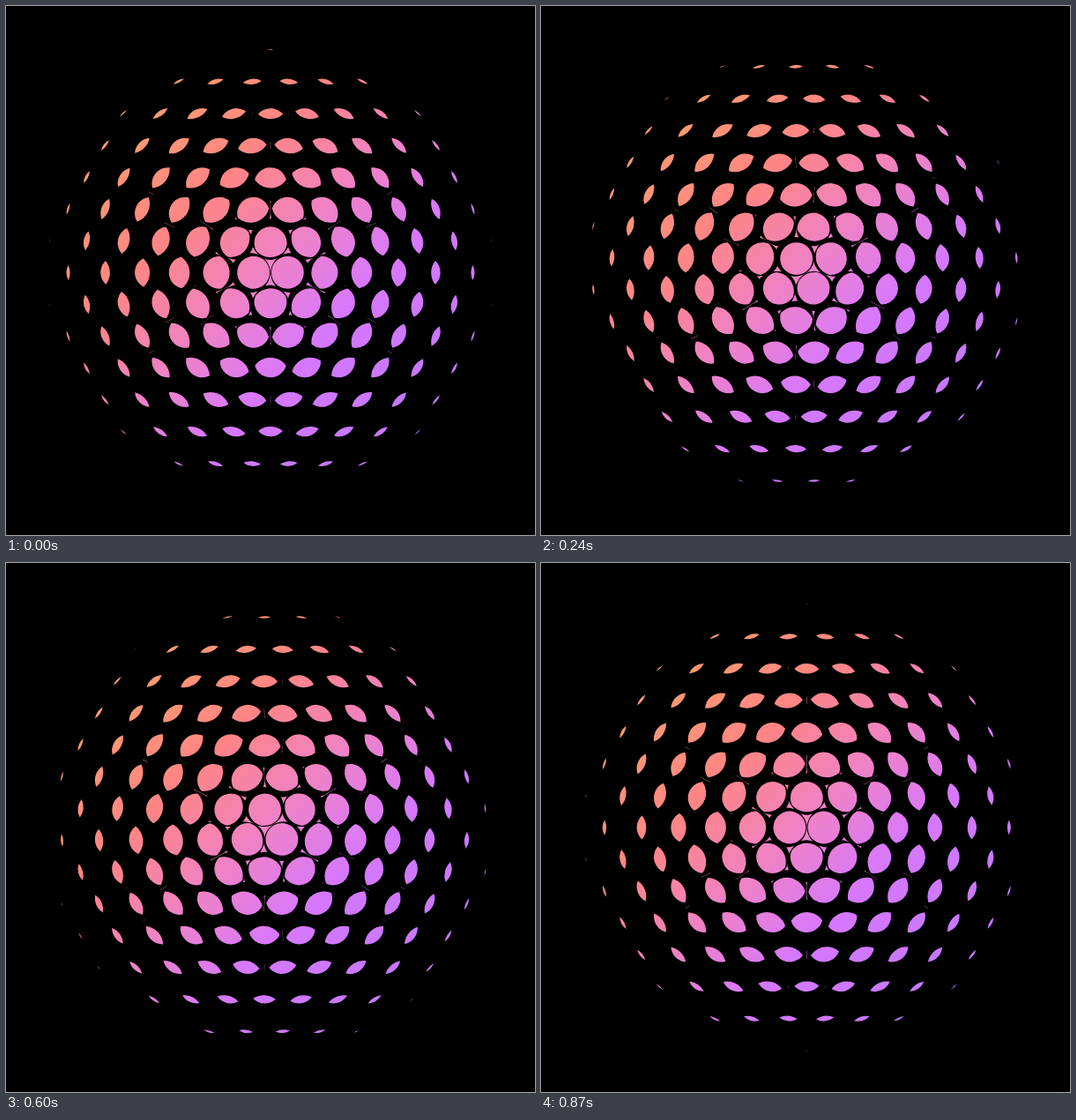
An HTML page with a canvas for the animation above (0.9 s loop, 600x600 px).

```html
<!DOCTYPE html>
<html>
<head>
<meta charset="utf-8">
<style>
html, body { margin: 0; width: 100%; height: 100%; overflow: hidden; background: #000; }
canvas { display: block; width: 600px; height: 600px; }
</style>
</head>
<body>
<canvas id="stage" width="600" height="600"></canvas>
<script>
// A hexagonal bundle of black tubes in perspective, sliding over a gradient.
const ctx = document.getElementById('stage').getContext('2d');
const C = 300;                    // vanishing point
const GAP = 42;                   // tube spacing
const ROW = GAP * Math.sqrt(3) / 2;
const INNER = 20, OUTER = 20.8;   // tube radii
const FAR = 0.922, NEAR = 1.078;  // scale of the two tube ends
const STEP = 30, STEPS = 15;      // one lattice move takes 450 ms
const { PI, cos, sin, acos, atan2, hypot } = Math;

const paint = ctx.createLinearGradient(100, 100, 500, 500);
[[0, '#ffa566'], [0.31, '#ff8585'], [0.5, '#ee82c8'],
 [0.67, '#d678ff'], [1, '#bd78ff']].forEach(([p, c]) => paint.addColorStop(p, c));

function disc(x, y, r) {
  ctx.moveTo(C + x + r, C + y);
  ctx.arc(C + x, C + y, r, 0, 2 * PI);
}

function arc(rho, dir, r, from, to) {
  ctx.arc(C + rho * cos(dir), C + rho * sin(dir), r, from, to);
}

// Silhouette of a whole tube: hull of its two end discs.
function hull({ x, y, rho, dir }) {
  const a = OUTER * FAR, b = OUTER * NEAR, d = rho * (NEAR - FAR);
  ctx.beginPath();
  if (d <= b - a) {
    disc(x * NEAR, y * NEAR, b);
  } else {
    const f = acos((a - b) / d);
    arc(rho * NEAR, dir, b, dir - f, dir + f);
    arc(rho * FAR, dir, a, dir + f, dir - f + 2 * PI);
    ctx.closePath();
  }
  ctx.fill();
}

// Opening seen through a tube: overlap of its two end holes.
function hole({ x, y, rho, dir }) {
  const a = INNER * FAR, b = INNER * NEAR, d = rho * (NEAR - FAR);
  if (d >= a + b) return;
  ctx.beginPath();
  if (d <= b - a) {
    disc(x * FAR, y * FAR, a);
  } else {
    const f = acos((d * d + a * a - b * b) / (2 * d * a));
    const g = acos((d * d + b * b - a * a) / (2 * d * b));
    arc(rho * FAR, dir, a, dir - f, dir + f);
    arc(rho * NEAR, dir, b, dir + PI - g, dir + PI + g);
    ctx.closePath();
  }
  ctx.fill();
}

function tubesAt(p) {
  const tubes = [];
  for (let j = -10; j <= 9; j++) {
    for (let i = -9; i <= 9; i++) {
      const x = (i + (j & 1 ? 0 : 0.5) - p / 2) * GAP;
      const y = (j + p) * ROW + ROW / STEPS;
      const rho = hypot(x, y);
      if (rho < 320) tubes.push({ x, y, rho, dir: atan2(y, x) });
    }
  }
  return tubes;
}

function draw(now) {
  const tubes = tubesAt(Math.floor(now / STEP) % STEPS / STEPS);
  ctx.fillStyle = '#000';
  ctx.fillRect(0, 0, 600, 600);
  ctx.fillStyle = paint;
  ctx.beginPath();
  disc(0, 0, 250);
  ctx.fill();
  ctx.fillStyle = '#000';
  tubes.forEach(hull);
  ctx.fillStyle = paint;
  tubes.forEach(hole);
}

const start = performance.now();
function tick() {
  draw(performance.now() - start);
  requestAnimationFrame(tick);
}
tick();
</script>
</body>
</html>
```
